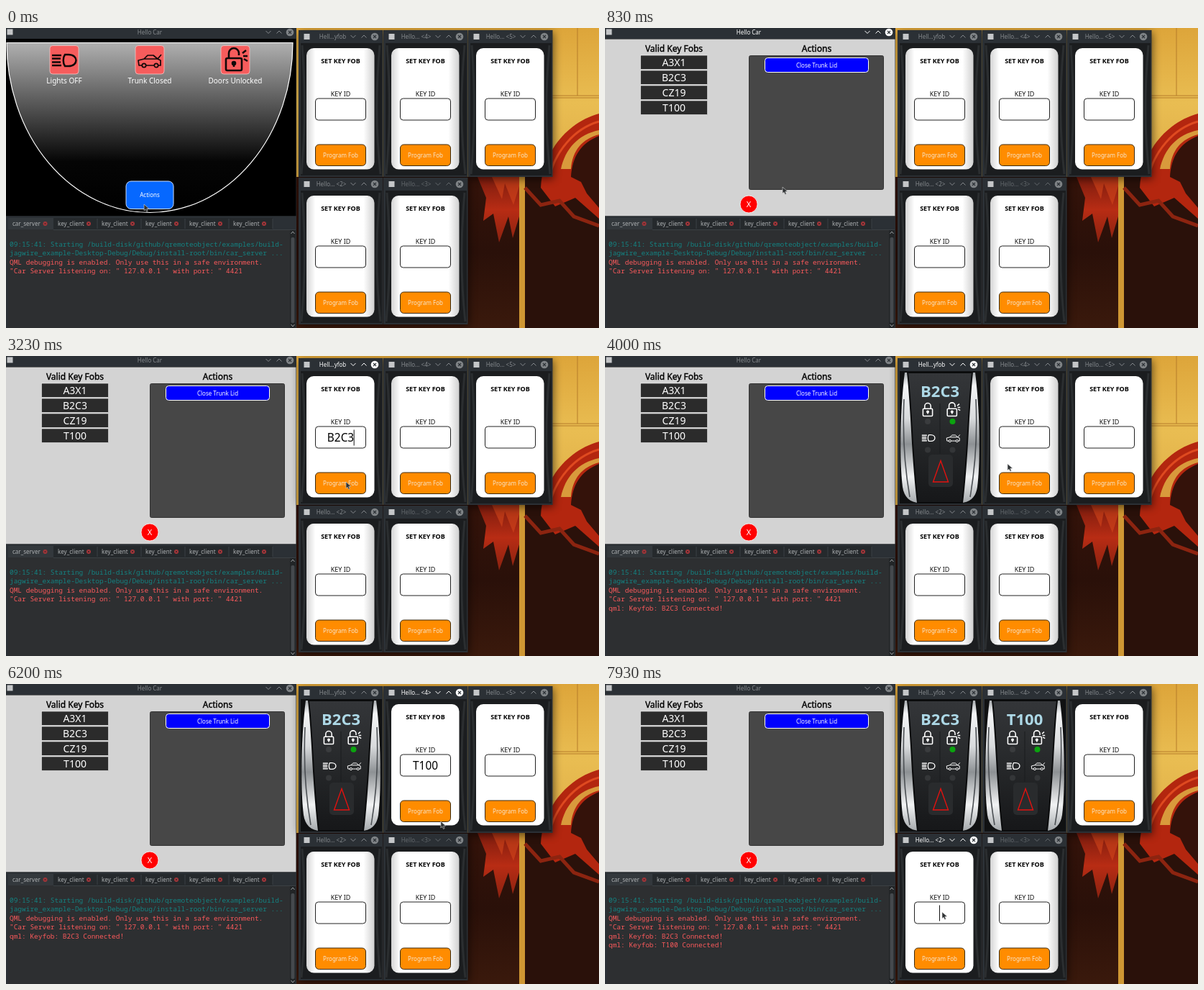
These frames come from a looping animation (825x417 px, 8 s). An HTML page:

```html
<!DOCTYPE html>
<html lang="en">
<head>
<meta charset="utf-8">
<title>Hello Car</title>
<style>
html, body { margin: 0; width: 100%; height: 100%; overflow: hidden; background: #1d1f21; }
svg { display: block; width: 825px; height: 417px; font-family: "Noto Sans", sans-serif; }
.mid { text-anchor: middle; }
.mono { font: 9.48px "Noto Sans Mono", monospace; white-space: pre; }
.badge { text-anchor: middle; font-weight: 700; font-stretch: 87.5%; }
</style>
</head>
<body>
<svg id="stage" viewBox="0 0 825 417" xmlns="http://www.w3.org/2000/svg"></svg>
<script>
const LOOP = 8000;
const stage = document.getElementById('stage');
const $ = id => document.getElementById(id);

const rect = (x, y, w, h, fill, more = '') =>
  `<rect x="${x}" y="${y}" width="${w}" height="${h}" fill="${fill}" ${more}/>`;
const text = (x, y, size, fill, str, more = 'class="mid"') =>
  `<text x="${x}" y="${y}" font-size="${size}" fill="${fill}" ${more}>${str}</text>`;
const path = (d, more) => `<path d="${d}" ${more}/>`;
const use = (id, x, y, scale, color) =>
  `<use href="#${id}" transform="translate(${x} ${y}) scale(${scale})" color="${color}"/>`;
const gradient = (id, dir, stops) =>
  `<linearGradient id="${id}" ${dir}>${stops.map(([o, c]) =>
    `<stop offset="${o}" stop-color="${c}"/>`).join('')}</linearGradient>`;

const DOWN = 'x1="0" y1="0" x2="0" y2="1"';
const defs = () => `<defs>
  ${gradient('dome', DOWN, [[0, '#b0b0b0'], [.3, '#666'], [.7, '#050505'], [1, '#000']])}
  ${gradient('card', '', [[0, '#d4d4d4'], [.13, '#fff'], [.84, '#fff'], [1, '#d0d0d0']])}
  ${gradient('gold', DOWN, [[0, '#dda53a'], [.25, '#e9bd52'], [1, '#c98a2a']])}
  ${gradient('soil', DOWN, [[0, '#34130a'], [.5, '#2a1009'], [1, '#3a190c']])}
  ${gradient('flame', DOWN, [[0, '#7c1c0e'], [.5, '#b82c14'], [1, '#8a2210']])}
  ${gradient('chrome', DOWN, [[0, '#a9adb0'], [.1, '#f4f5f6'], [.35, '#d9dbdd'],
    [.55, '#8d9194'], [.8, '#f2f3f4'], [1, '#a5a9ac']])}
  ${gradient('body', DOWN, [[0, '#343639'], [.5, '#26282a'], [1, '#161719']])}
  <filter id="soft" x="-20%" y="-20%" width="140%" height="140%"><feGaussianBlur stdDeviation="6"/></filter>
  <clipPath id="carClip"><rect y="15" width="403.5" height="246.3"/></clipPath>
  <g id="lamp" fill="none" stroke="currentColor" stroke-width="2.5">
    <path d="M-17 -7H-4M-17 -2.4H-5M-17 2.4H-5M-17 7H-4M1 -8H6C20 -8 20 8 6 8H1C-2 4 -2 -4 1 -8Z"/></g>
  <g id="trunk" fill="none" stroke="currentColor" stroke-width="1.7" stroke-linejoin="round">
    <path d="M-11 7H-15L-16 0 -8 -2 -3 -7H5L11 -2 16 -8M11 -2 15 0V7H12M-5 7H6M-8 -2H11"/>
    <circle cx="-8" cy="7" r="2.7"/><circle cx="9" cy="7" r="2.7"/></g>
  <g id="lock" fill="none" stroke="currentColor" stroke-width="2.6">
    <path d="M-7 -2V-8A7 7 0 0 1 7 -8V-2"/><rect x="-11" y="-2" width="22" height="17" rx="2"/>
    <circle cy="5" r="2" fill="currentColor"/><path d="M0 5V10"/></g>
  <g id="unlock" fill="none" stroke="currentColor" stroke-width="2.6">
    <path d="M-9 -2V-9A7 7 0 0 1 5 -9V-6"/><rect x="-13" y="-2" width="22" height="17" rx="2"/>
    <circle cx="-2" cy="5" r="2" fill="currentColor"/><path d="M-2 5V10M10 -9 15 -13M11 -5H17M12 -1 17 2" /></g>
</defs>`;

const wallpaper = () =>
  rect(404, 0, 421, 417, 'url(#gold)') +
  path('M760 94H825M795 0V94M760 97H825', 'stroke="#b67d2b" fill="none"') +
  rect(404, 207, 310, 210, 'url(#soil)') +
  path('M656 207H714V262L705 292 699 262 686 298 678 258 664 268 668 236Z', 'fill="url(#flame)"') +
  path('M676 207 690 238 694 216 706 246 714 220V207Z', 'fill="#d2451c" opacity=".6"') +
  rect(714, 200, 8, 217, '#cf9733') +
  path('M722 207H825V417H722Z', 'fill="#2a110a"') +
  path('M744 222C746 176 778 132 825 119V265L792 236 764 248Z', 'fill="#b3260f"') +
  path('M772 196C778 168 796 148 825 142V148C802 154 788 170 786 196Z', 'fill="#d99a3c"') +
  path('M786 207C788 178 800 160 825 150V250L808 230 800 214Z', 'fill="#34120a"') +
  path('M756 207C764 172 790 140 825 130', 'stroke="#df4a20" stroke-width="3" fill="none"') +
  path('M722 222 744 246 770 240 790 262 825 275', 'stroke="#8c2410" stroke-width="5" fill="none"');

// Title bar buttons, centred on the up chevron
const buttons = (id, x, y) =>
  path(`M${x - 18.5} ${y - 2}l3.5 3.5 3.5 -3.5M${x - 3.5} ${y + 1.5}l3.5 -3.5 3.5 3.5`,
    `id="${id}Arrows" fill="none" stroke="#9a9ea1"`) +
  `<circle id="${id}Close" cx="${x + 15}" cy="${y}" r="5.3" fill="#8b8f92"/>` +
  path(`M${x + 13} ${y - 2}l4 4m0 -4l-4 4`, 'stroke="#2b3035" stroke-width="1.1"');

const keyRow = (name, i) =>
  rect(49.5, 38 + 21 * i, 93, 19.5, '#2b2b2b', 'stroke="#f0f0f0" stroke-width=".6"') +
  text(96, 53 + 21 * i, 14, '#fff', name);

const carIcon = (x, icon, label) =>
  rect(x - 20, 24.5, 40, 39.5, '#f65c5c', 'rx="4" stroke="#f4c4c4" stroke-width=".8"') +
  use(icon, x, icon === 'unlock' ? 44 : 45, 1, '#100808') + text(x, 77, 10, '#fff', label);

const heading = (x, str) => text(x, 33, 12, '#000', str, 'class="mid" stroke="#000" stroke-width=".4"');

const car = () =>
  rect(0, 0, 404, 263, '#2b3035') + rect(1.5, 1.5, 8, 8, '#c4c6c8') +
  text(200, 9.3, 8, '#999', 'Hello Car', 'class="mid" id="carTitle"') + buttons('car', 380, 6) +
  `<g clip-path="url(#carClip)">` + rect(0, 15, 404, 247, '#000') +
  path('M1 20.5H399A199 236 0 0 1 1 20.5Z', 'fill="url(#dome)" stroke="#fff" stroke-width="1.2"') +
  carIcon(81, 'lamp', 'Lights OFF') + carIcon(200, 'trunk', 'Trunk Closed') +
  carIcon(319, 'unlock', 'Doors Unlocked') +
  rect(167, 213, 66, 38.5, '#0668ff', 'rx="7" stroke="#c9dcff"') + text(200, 235.3, 8, '#fff', 'Actions') +
  `<g id="panel">` + rect(0, 15.5, 404, 248, '#d3d3d3') +
  heading(96, 'Valid Key Fobs') + heading(294.5, 'Actions') +
  ['A3X1', 'B2C3', 'CZ19', 'T100'].map(keyRow).join('') +
  rect(200.5, 38.5, 187, 186, '#474747', 'rx="2" stroke="#333"') +
  rect(222.5, 41.5, 144, 20, '#00f', 'rx="4" stroke="#fff"') + text(294.5, 54.6, 8, '#fff', 'Close Trunk Lid') +
  `<circle cx="200" cy="245" r="12" fill="#f00" stroke="#fff" stroke-width=".8"/>` +
  text(200, 249, 11, '#fff', 'X') + `</g>` +
  rect(407, 10, 60, 196, '#000', 'id="cast" opacity=".5" filter="url(#soft)"') + `</g>`;

const tab = (x, dot, name) => text(x, 275, 8, '#aeb1b3', name, '') +
  `<circle cx="${dot}" cy="272" r="3" fill="#a5363a"/>` +
  path(`M${dot - 1.2} 270.8l2.4 2.4m0 -2.4l-2.4 2.4`, 'stroke="#3a2527" stroke-width=".8"');

const LINES = [
  '09:15:41: Starting /build-disk/github/qremoteobject/examples/build-',
  'jagwire_example-Desktop-Debug/Debug/install-root/bin/car_server ...',
  'QML debugging is enabled. Only use this in a safe environment.',
  '"Car Server listening on: " 127.0.0.1 " with port: " 4421',
  'qml: Keyfob: B2C3 Connected!',
  'qml: Keyfob: T100 Connected!'
];

const terminal = () =>
  rect(0, 262, 404, 155, '#2b3035') + rect(3, 264, 368, 16, '#25292c') + rect(3, 264, 63, 17, '#33383c') +
  [...Array(5).keys()].map(i => rect(126.5 + 61 * i, 265, 1, 14, '#3b4044')).join('') +
  rect(3, 280, 400, 137, '#2d2f31') + path('M66 280.5H403', 'stroke="#3b4044"') +
  tab(9, 54.5, 'car_server') + [...Array(5).keys()].map(i => tab(72 + 61 * i, 115 + 61 * i, 'key_client')).join('') +
  rect(395, 281, 8, 136, '#222527') + rect(396.5, 291, 5, 119, '#45494d', 'rx="2"') +
  path('M396.5 286l2.5 -3 2.5 3M396.5 412l2.5 3 2.5 -3', 'stroke="#9a9ea1" fill="none"') +
  LINES.map((s, i) => `<text id="line${i}" class="mono" x="5" y="${304 + 12.4 * i}" fill="${i < 2 ? '#148281' : '#f9595b'}">${s}</text>`).join('');

const FOBS = [
  { x: 0, y: 0, title: 'Hell...yfob', key: 'B2C3' },
  { x: 118, y: 0, title: 'Hello... &lt;4&gt;', key: 'T100' },
  { x: 236, y: 0, title: 'Hello... &lt;5&gt;' },
  { x: 0, y: 205, title: 'Hello... &lt;2&gt;' },
  { x: 118, y: 205, title: 'Hello... &lt;3&gt;', dim: true }
];

const form = i => `<g id="form${i}">` +
  rect(418, 28, 94.5, 168.5, '#fff', `id="card${i}" rx="10"`) +
  text(465.5, 49, 9, '#000', 'SET KEY FOB', 'class="mid" font-weight="700"') + text(465.5, 94.7, 9, '#111', 'KEY ID') +
  rect(430.5, 98, 70, 30, '#fff', 'rx="4" stroke="#222"') +
  text(465.5, 119, 15.4, '#000', '', `class="mid" id="entry${i}"`) +
  rect(465, 102.5, 1, 22, '#111', `id="caret${i}"`) +
  rect(430.5, 162, 70, 29.5, '#ff8c00', 'rx="5" stroke="#3a2a10"') +
  text(465.5, 179.8, 8, '#f6e6d2', 'Program Fob') + `</g>`;

const remote = (i, key) => `<g id="remote${i}">` +
  rect(410, 21, 113, 184, '#101112') +
  path('M417 23H515C521 70 523 140 518 182 516 196 508 204 494 204H438C424 204 416 196 414 182 409 140 411 70 417 23Z', 'fill="url(#chrome)"') +
  path('M421 23H511C505 75 505 140 497 204H435C427 140 427 75 421 23Z', 'fill="url(#body)" stroke="#0a0b0c" stroke-width="2"') +
  path('M416 60C414 105 416 150 424 196M516 60C518 105 516 150 508 196', 'fill="none" stroke="#4b4f53" stroke-width="1.6"') +
  path('M466 66V136', 'stroke="#1b1c1e"') + rect(450, 137, 34, 45, '#292b2d', 'rx="5"') +
  text(466, 56.5, 22, '#add8e6', key, 'class="badge"') +
  use('lock', 449, 74.5, .6, '#fff') + use('unlock', 484, 74.5, .6, '#fff') +
  use('lamp', 450, 114, .54, '#fff') + use('trunk', 484.5, 114, .58, '#fff') +
  [[449, 91, '#3a3c3e'], [483.5, 91, '#0ba30f'], [449, 130.5, '#343638'], [483.5, 130.5, '#343638']]
    .map(([x, y, c]) => `<circle cx="${x}" cy="${y}" r="4" fill="${c}"/>`).join('') +
  path('M467 145.5 477.5 175H456.5Z', 'fill="none" stroke="#e3120f" stroke-width="1.4"') + `</g>`;

const fob = (f, i) => `<g transform="translate(${f.x} ${f.y})">` +
  rect(407, 3, 117.5, 204, '#2b3035') + rect(410, 21, 113, 184, '#1b1d1f') +
  path('M412 24C417 90 416 150 411 203M520 24C514 90 515 150 521 203', 'stroke="#2b2e30" stroke-width="3" fill="none"') +
  rect(414.5, 8, 8, 8, '#c4c6c8') +
  text(i ? 452.5 : 454.5, 15, 8, '#999', f.title, `class="mid" id="title${i}"`) + buttons('fob' + i, 498, 12) +
  form(i) + (f.key ? remote(i, f.key) : '') + `</g>`;

const shadow = (x, y, w, h) => rect(x, y, w, h, '#000', 'opacity=".55" filter="url(#soft)"');

stage.innerHTML = defs() + wallpaper() + shadow(408, 6, 354, 204) + shadow(408, 210, 236, 204) +
  car() + terminal() + FOBS.map(fob).join('') +
  path('M0 0V9L2 7.2 3.7 10.4 5.3 9.6 3.8 6.5 6.8 6.1Z', 'id="pointer" fill="#2f3234" stroke="#d8d8d8" stroke-width=".6"');

// Pointer path: time, x, y
const POINTER = [
  [0, 192, 245], [200, 192, 245], [370, 193, 239], [630, 193, 239], [770, 229, 227], [830, 247, 221],
  [1669, 247, 221], [1670, 471, 108], [2270, 471, 108], [2630, 472, 119], [2900, 472, 119],
  [3230, 473, 175], [3430, 473, 175], [3800, 560, 150], [4000, 560, 150], [4230, 569, 134],
  [6000, 569, 134], [6200, 605, 191], [6330, 587, 192], [6469, 587, 192], [6470, 605, 193],
  [6700, 605, 192], [7030, 577, 167], [7330, 577, 167], [7830, 469, 317], [LOOP, 469, 317]
];

// The latest value whose start time has passed
const latest = (steps, t) => steps.filter(s => s[0] <= t).pop()[1];

const FOCUS = [[0, ''], [630, 'car'], [1670, 0], [4030, 1], [7830, 3]];
const TYPED = [
  [[0, ''], [2130, 'B'], [2270, 'B2'], [2630, 'B2C'], [2770, 'B2C3']],
  [[0, ''], [4770, 'T'], [5100, 'T1'], [5200, 'T10'], [5400, 'T100']]
];
const CARET = [[0, 1], [4430, 0], [4770, 1], [5830, 0], [6330, 1], [6830, 0], [7830, 1]];
const PAIRED = [3530, 7400];

function pointerAt(t) {
  const i = Math.max(1, POINTER.findIndex(p => p[0] > t));
  const [t0, x0, y0] = POINTER[i - 1], [t1, x1, y1] = POINTER[i];
  const k = (t - t0) / (t1 - t0);
  return [x0 + (x1 - x0) * k, y0 + (y1 - y0) * k];
}

const show = (id, on) => $(id).setAttribute('visibility', on ? 'visible' : 'hidden');

function paintBar(id, titleId, active, dim) {
  const idle = dim ? '#63686c' : '#85898d';
  $(titleId).setAttribute('fill', active ? '#fff' : idle);
  $(id + 'Arrows').setAttribute('stroke', active ? '#fff' : idle);
  $(id + 'Close').setAttribute('fill', active ? '#fff' : '#7f8386');
}

function draw(t) {
  const focus = latest(FOCUS, t);
  const slide = Math.min(1, Math.max(0, (t - 630) / 200)) ** 3;
  $('panel').setAttribute('transform', `translate(0 ${247.5 * (1 - slide)})`);
  paintBar('car', 'carTitle', focus === 'car');
  show('cast', typeof focus === 'number');

  FOBS.forEach((f, i) => {
    const active = focus === i;
    const paired = t >= PAIRED[i];
    paintBar('fob' + i, 'title' + i, active, f.dim);
    $('card' + i).setAttribute('fill', active || i === 2 ? '#fff' : 'url(#card)');
    const entry = $('entry' + i);
    entry.textContent = TYPED[i] ? latest(TYPED[i], t) : '';
    const width = entry.textContent ? entry.getComputedTextLength() : 0;
    $('caret' + i).setAttribute('x', 465 + width / 2);
    show('caret' + i, active && !paired && latest(CARET, t));
    show('form' + i, !paired);
    if (f.key) {
      show('remote' + i, paired);
      show('line' + (4 + i), paired);
    }
  });
  $('pointer').setAttribute('transform', `translate(${pointerAt(t).join(' ')})`);
}

const start = performance.now();
function tick() {
  draw((performance.now() - start) % LOOP);
  requestAnimationFrame(tick);
}
tick();
</script>
</body>
</html>
```
